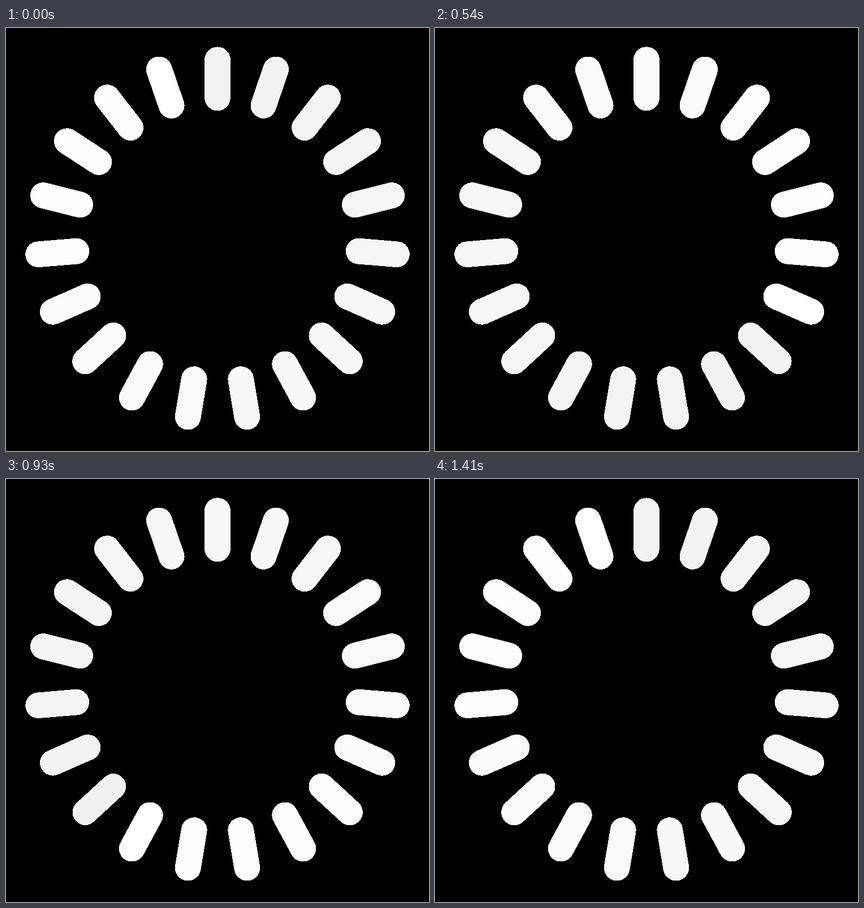
These frames come from a looping animation (748x748 px, 1.44 s). An HTML page:

```html
<!DOCTYPE html>
<html lang="en">
<head>
<meta charset="utf-8">
<title>Spinner</title>
<style>
  html, body { margin: 0; width: 100%; height: 100%; overflow: hidden; background: #000; }
  svg { display: block; width: 100%; height: 100%; }
</style>
</head>
<body>
<svg viewBox="0 0 748 748"></svg>
<script>
  const BARS = 19, FRAMES = 48, FRAME_MS = 30;
  const CYCLE = BARS * (FRAMES - 1);
  const svg = document.querySelector('svg');

  function add(parent, tag, attrs) {
    const node = document.createElementNS('http://www.w3.org/2000/svg', tag);
    for (const name in attrs) node.setAttribute(name, attrs[name]);
    return parent.appendChild(node);
  }

  // Each bar's filter turns every pixel it touches into one solid colour.
  const bars = Array.from({ length: BARS }, (_, i) => {
    const filter = add(svg, 'filter', {
      id: `solid${i}`, filterUnits: 'userSpaceOnUse', x: 0, y: 0, width: 748, height: 748,
      'color-interpolation-filters': 'sRGB'
    });
    const matrix = add(filter, 'feColorMatrix', { type: 'matrix' });
    const group = add(svg, 'g', { filter: `url(#solid${i})` });
    const rect = add(group, 'rect', {
      x: 351.56, y: 33.66, width: 44.88, height: 112.2, rx: 22.44, fill: '#fff',
      transform: `rotate(${i * 360 / BARS} 374 374)`
    });
    return { matrix, rect };
  });

  let shown = -1;

  function draw() {
    requestAnimationFrame(draw);
    const step = Math.floor(performance.now() / FRAME_MS) % FRAMES;
    if (step === shown) return;
    shown = step;
    bars.forEach(({ matrix, rect }, i) => {
      // Integer phase keeps the reset exact; the last step repeats the first pose.
      const age = (step * BARS + (BARS - 1 - i) * (FRAMES - 1)) % CYCLE;
      const strength = 1 - age / CYCLE;
      const level = Math.round(241 + 14 * strength);
      const blue = Math.min(255, level + Math.round(2 * (1 - strength)));
      const [r, b] = [level / 255, blue / 255];
      rect.setAttribute('fill-opacity', strength);
      // Alpha above 1/255 becomes opaque, anything fainter vanishes.
      matrix.setAttribute('values',
        `0 0 0 0 ${r}  0 0 0 0 ${r}  0 0 0 0 ${b}  0 0 0 255 -1`);
    });
  }
  draw();
</script>
</body>
</html>
```
